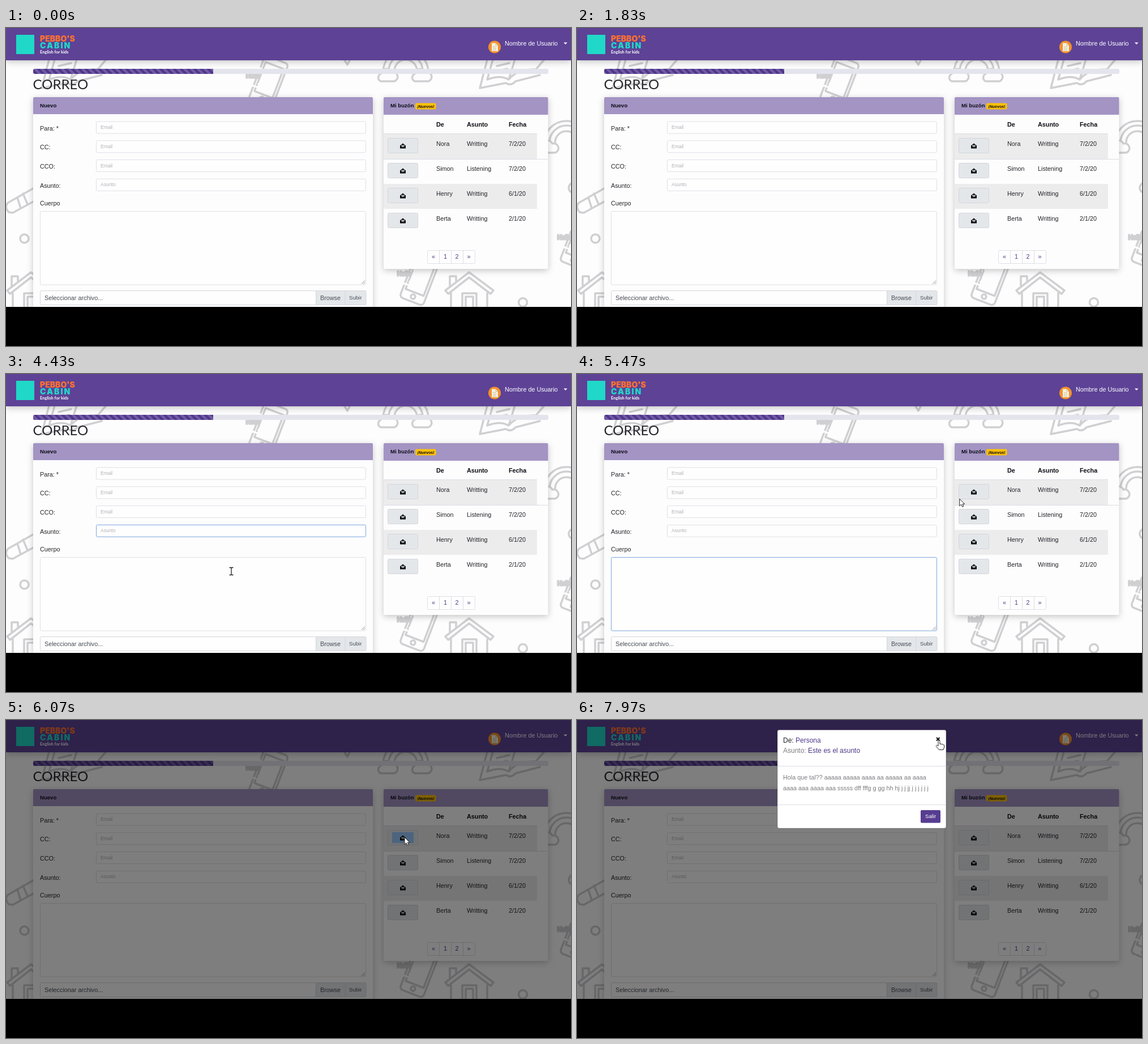
These frames come from a looping animation (998x561 px, 8000 ms). An HTML page:

```html
<!DOCTYPE html>
<html lang="es">
<head>
<meta charset="utf-8">
<title>Correo</title>
<style>
  html, body { margin: 0; height: 100%; overflow: hidden; background: #000; }
  svg { display: block; width: 100vw; height: 100vh; }
  text { font: 10.8px "Liberation Sans", Arial, sans-serif; fill: #25252b; white-space: pre; }
  .bold { font-weight: bold; fill: #0d0d14; }
  .small { font-size: 9.6px; }
  .hint { font-size: 8.5px; fill: #b2b2b6; }
  .purple { fill: #503a88; }
  .gray { fill: #7d7d82; }
  .white { fill: #fff; }
  .card { filter: drop-shadow(0 3px 6px rgba(0, 0, 0, .22)); }
  .field { fill: #fefefe; stroke: #dfe0e6; }
  .line { fill: none; stroke: #dcdde3; }
  .button { fill: #e4e7ea; stroke: #d2d6dc; }
  .doodle { fill: none; stroke: #d0d0d3; stroke-width: 3.5; stroke-linejoin: round; stroke-linecap: round; }
  .doodle .solid { fill: #cfcfd2; stroke: none; }
  .doodle .paper { fill: #fdfdfd; stroke: none; }
  .doodle text { font: bold 9px Lato, sans-serif; fill: #fff; stroke: none; }
  .logo { font: 900 15px Inter, sans-serif; }
  .pointer { fill: #fff; stroke: #222; stroke-width: 1; stroke-linejoin: round; }
</style>
</head>
<body>
<svg viewBox="0 0 998 561" preserveAspectRatio="none">
  <defs>
    <clipPath id="page"><rect width="998" height="492"/></clipPath>
    <pattern id="stripes" width="12" height="12" patternUnits="userSpaceOnUse">
      <rect width="12" height="12" fill="#4f3689"/>
      <path d="M0 0H6L12 6V12ZM0 6L6 12H0Z" fill="#715ba6"/>
    </pattern>
    <g id="phone">
      <g transform="translate(730 445) rotate(21)">
        <rect class="solid" x="-22" y="-43" width="44" height="83" rx="6"/>
        <rect class="paper" x="-17" y="-32" width="34" height="55"/>
        <circle class="paper" cy="31" r="4"/>
      </g>
      <path class="solid" d="M683 433a20 17 0 1 1 30 15l4 8-12-5a20 17 0 0 1-22-18Z" stroke="#fdfdfd"/>
      <text x="691" y="437">Hello</text>
    </g>
    <g id="rainbow">
      <path d="M666 78a40 40 0 0 1 80 0M676 76a30 30 0 0 1 60 0M686 76a20 20 0 0 1 40 0"/>
      <path id="cloud" d="M662 94a7 7 0 0 1 0-13a10 10 0 0 1 19-3a8 8 0 0 1 5 16Z" fill="#fdfdfd"/>
      <use href="#cloud" x="60"/>
    </g>
    <g id="doodles">
      <path d="M851 52L837 106L883 97Q892 103 900 94L943 83M861 52L850 91Q873 82 888 91Q903 72 936 73L954 52M888 91L900 52M867 67l22-5M863 77l22-5"/>
      <use href="#rainbow"/>
      <use href="#rainbow" x="284" y="126"/>
      <use href="#phone"/>
      <use href="#phone" x="283" y="-64"/>
      <use href="#phone" x="-267" y="-349"/>
      <path d="M776 463L818 431L861 463L856 469L818 440L781 469ZM784 455V438H795V446M786 468V495M850 468V495M806 495V468H831V495M812 495V474H825V495"/>
      <path d="M822 283L778 308Q770 315 779 325L786 326L830 302M804 292L812 311M794 299L800 318"/>
      <circle class="solid" cx="806.500" cy="371.500" r="7.500"/>
      <circle class="solid" cx="913" cy="484" r="7.500"/>
      <circle class="solid" cx="1003" cy="282" r="9"/>
      <path class="solid" d="M597 55h11l-5 10Z"/>
    </g>
    <g id="mail">
      <path d="M-5-1L0-5L5-1V4H-5Z" fill="#08080c"/>
      <path d="M-3-2H3V0L0 2L-3 0Z" fill="#a9abb2"/>
    </g>
  </defs>

  <g clip-path="url(#page)">
    <rect width="998" height="492" fill="#fdfdfd"/>
    <g class="doodle"><use href="#doodles"/><use href="#doodles" x="-774"/></g>

    <rect class="card" width="998" height="57" fill="#5d4296"/>
    <rect x="18" y="12" width="32" height="34" fill="#20d8c8"/>
    <text class="logo" x="60" y="23.500" style="fill:#ff7031;font-size:14px">PEBBO'S</text>
    <text class="logo" x="60" y="36" style="fill:#20d8c8;letter-spacing:2px;font-size:14px">CABIN</text>
    <text class="white" x="60" y="45" style="font:bold 7.500px Lato,sans-serif">English for kids</text>
    <circle cx="863" cy="33.500" r="11" fill="#f3912b"/>
    <path d="M858 26.500H865L869 30.500V41H858Z" fill="#f7f1df"/>
    <path d="M865 26.500V30.500H869M860 33h6M860 36h6M860 39h6" fill="none" stroke="#c9b793"/>
    <text class="white" x="881" y="31">Nombre de Usuario</text>
    <path class="white" d="M985 25.500h6.500l-3.250 3.500Z" fill="#fff"/>

    <rect x="48" y="72" width="910" height="9" rx="3" fill="#e4e4ed"/>
    <path d="M51 72H366V81H51a3 3 0 0 1-3-3V75a3 3 0 0 1 3-3Z" fill="url(#stripes)"/>
    <text x="47.500" y="107.500" style="font:24px Lato,sans-serif">CORREO</text>

    <g class="card">
      <rect x="48" y="122" width="600" height="390" rx="2" fill="#fdfdfd"/>
      <path d="M48 152V124a2 2 0 0 1 2-2H646a2 2 0 0 1 2 2V152Z" fill="#a394c4"/>
    </g>
    <g class="card">
      <rect x="667" y="122" width="290.500" height="303" rx="2" fill="#fdfdfd"/>
      <path d="M667 153V124a2 2 0 0 1 2-2H955.500a2 2 0 0 1 2 2V153Z" fill="#a394c4"/>
    </g>
    <text class="bold small" x="60" y="140">Nuevo</text>
    <text class="bold small" x="679" y="140">Mi buzón</text>
    <rect x="723" y="132.500" width="36.500" height="11" rx="2" fill="#ffc107"/>
    <text class="bold" x="726" y="140.500" style="font-size:7.200px">¡Nuevos!</text>

    <g id="form"></g>
    <path d="M628 451.500L634 445.500M631.500 451.500L634 449" stroke="#888"/>
    <rect class="field" x="60.500" y="463.500" width="487" height="25" rx="2" style="stroke:#d4d6dc"/>
    <path class="button" d="M547.500 463.500H634a2 2 0 0 1 2 2V486.500a2 2 0 0 1-2 2H547.500ZM599 463.500V488.500"/>
    <text x="68" y="479.500" style="fill:#484c54">Seleccionar archivo...</text>
    <text x="555" y="479.500" style="fill:#484c54">Browse</text>
    <text class="small" x="606" y="479" style="fill:#484c54">Subir</text>

    <g id="inbox"></g>
    <rect class="field" x="744.500" y="392.500" width="84" height="23" rx="2"/>
    <path class="line" d="M765.500 392V416M786.500 392V416M807.500 392V416"/>
    <text class="purple" x="752" y="407">«</text>
    <text class="purple" x="773" y="407">1</text>
    <text class="purple" x="793.500" y="407">2</text>
    <text class="purple" x="814.500" y="407">»</text>

    <rect id="backdrop" width="998" height="492"/>
    <g id="modal">
      <rect x="354" y="17.500" width="298" height="173.500" rx="3" fill="#fff" stroke="#333" stroke-opacity=".35"/>
      <path class="line" d="M354 81.500H652M354 149.500H652"/>
      <text x="364" y="39.500" style="font-size:12px">De: <tspan class="purple">Persona</tspan></text>
      <text class="gray" x="364" y="57.500" style="font-size:12px">Asunto: <tspan class="purple">Este es el asunto</tspan></text>
      <text class="gray" x="364" y="104.500">Hola que tal?? aaaaa aaaaa aaaa aa aaaaa aa aaaa</text>
      <text class="gray" x="364" y="123.500">aaaa aaa aaaa aaa sssss dff fffg g gg hh hj j j jj j j j j j j</text>
      <path id="close" d="M635 31L640.500 36.500M640.500 31L635 36.500" stroke-width="2"/>
      <rect x="607" y="159" width="35" height="22.500" rx="2" fill="#573d91"/>
      <text class="white small" x="615" y="173">Salir</text>
    </g>

    <g id="cursor">
      <path id="arrow" class="pointer" d="M0 0V12.500L3 9.800L5 14L7.200 13L5.300 9H9.200Z"/>
      <path id="beam" d="M-3.500-6.500H-1L0-5.500L1-6.500H3.500M0-5.500V5.500M-3.500 6.500H-1L0 5.500L1 6.500H3.500" fill="none" stroke="#222" stroke-width="1.300"/>
      <path id="hand" class="pointer" d="M0 1.500a1.500 1.500 0 0 1 3 0V6.500l2-.5 1 1 2-.5 1 1.200 1.700.5V12l-1.700 4.500H1.500L-3.500 10.500a1.400 1.400 0 0 1 2-1.800L0 10Z"/>
    </g>
  </g>
</svg>
<script>
const LOOP = 8000;
const $ = id => document.getElementById(id);
const text = (x, y, content, cls = "") => `<text class="${cls}" x="${x}" y="${y}">${content}</text>`;
const box = (cls, x, y, w, h) => `<rect class="${cls}" x="${x}" y="${y}" width="${w}" height="${h}" rx="2"/>`;

const labels = ["Para: *", "CC:", "CCO:", "Asunto:"];
const fields = labels.map((_, i) => ({ x: 159.5, y: 165 + i * 33.75, w: 476, h: 21, caret: 167.5 }));
fields.push({ x: 60.5, y: 323.5, w: 575, h: 129.5, caret: 67.5 });

$("form").innerHTML =
  fields.map(f => box("field", f.x, f.y, f.w, f.h)).join("") +
  labels.map((label, i) =>
    text(60, 180.5 + i * 33.8, label) +
    text(167, 178 + i * 33.75, i < 3 ? "Email" : "Asunto", "hint")).join("") +
  text(60, 313, "Cuerpo") +
  '<path id="caret" d="M0 0V10" stroke="#222"/>';
const fieldBoxes = [...$("form").querySelectorAll(".field")];

const columns = [760, 814, 888];
const messages = [
  ["Nora", "Writting", "7/2/20"],
  ["Simon", "Listening", "7/2/20"],
  ["Henry", "Writting", "6/1/20"],
  ["Berta", "Writting", "2/1/20"]
];
const cells = (row, y, cls) => row.map((cell, i) => text(columns[i], y, cell, cls)).join("");
$("inbox").innerHTML =
  cells(["De", "Asunto", "Fecha"], 174, "bold") +
  messages.map((row, i) => {
    const y = 187 + i * 44;
    return (i % 2 ? "" : `<rect x="667" y="${y}" width="271" height="44" fill="#ececed"/>`) +
      box("button", 674.5, y + 7.5, 53, 26) +
      (i ? "" : '<rect id="selection" x="682" y="198" width="38" height="19"/>') +
      `<use href="#mail" x="701" y="${y + 21.5}"/>` + cells(row, y + 20.5);
  }).join("") +
  '<path class="line" d="M667 186.500H938M667 231.500H957"/>';

// Pointer path: time, x, y
const path = [
  [1950, 420, 500], [2400, 280, 176], [2500, 280, 176], [2800, 288, 210], [2900, 288, 210],
  [3200, 296, 243], [3300, 297, 244], [3470, 310, 262], [3750, 345, 276], [3900, 346, 277],
  [4430, 398, 348], [4700, 400, 350], [5650, 704, 207], [6750, 704, 207],
  [7530, 652, 92], [7900, 638, 36]
];
// Clicks: time, index of the field that takes focus
const clicks = [[2450, 0], [2850, 1], [3250, 2], [3850, 3], [4550, 4], [5800, -1]];

const clamp = v => Math.max(0, Math.min(1, v));
const progress = (t, start, length) => clamp((t - start) / length);
const show = (id, visible) => $(id).setAttribute("display", visible ? "inline" : "none");

function pointerAt(t) {
  const next = path.findIndex(key => key[0] > t);
  if (next === 0) return path[0].slice(1);
  if (next < 0) return path[path.length - 1].slice(1);
  const [t0, x0, y0] = path[next - 1], [t1, x1, y1] = path[next];
  const p = (t - t0) / (t1 - t0), e = p * p * (3 - 2 * p);
  return [x0 + (x1 - x0) * e, y0 + (y1 - y0) * e];
}

function drawFocus(t) {
  const [since, focused] = clicks.filter(c => c[0] <= t).pop() || [0, -1];
  fieldBoxes.forEach((el, i) => el.style.stroke = i === focused ? "#7ba6dc" : "");
  show("caret", focused >= 0 && (t - since) % 1060 < 530);
  if (focused >= 0) {
    const f = fields[focused];
    $("caret").setAttribute("transform", `translate(${f.caret} ${f.y + 5.5})`);
  }
}

function drawPointer(t) {
  const [x, y] = pointerAt(t);
  const onClose = t > 7000 && Math.hypot(x - 638, y - 34) < 9;
  const onField = t < 5900 && fields.some(f => x > f.x && x < f.x + f.w && y > f.y && y < f.y + f.h);
  $("cursor").setAttribute("transform", `translate(${x} ${y})`);
  show("hand", onClose);
  show("beam", onField);
  show("arrow", !onClose && !onField);
  $("close").setAttribute("stroke", onClose ? "#111" : "#666");
}

function draw(t) {
  $("stripes").setAttribute("patternTransform", `translate(${-12 * (t % 1000) / 1000} 72)`);
  drawFocus(t);
  drawPointer(t);
  show("selection", t >= 5800 && t < 6800);
  $("selection").setAttribute("fill", t < 6080 ? "#99c9ff" : "#efeff0");
  $("backdrop").setAttribute("opacity", 0.5 * progress(t, 5915, 150));
  $("modal").setAttribute("opacity", progress(t, 6080, 150));
  const slide = 1 - progress(t, 6080, 300);
  $("modal").setAttribute("transform", `translate(0 ${-37 * slide * slide})`);
}

const start = performance.now();
function tick() {
  draw((performance.now() - start) % LOOP);
  requestAnimationFrame(tick);
}
tick();
</script>
</body>
</html>
```
